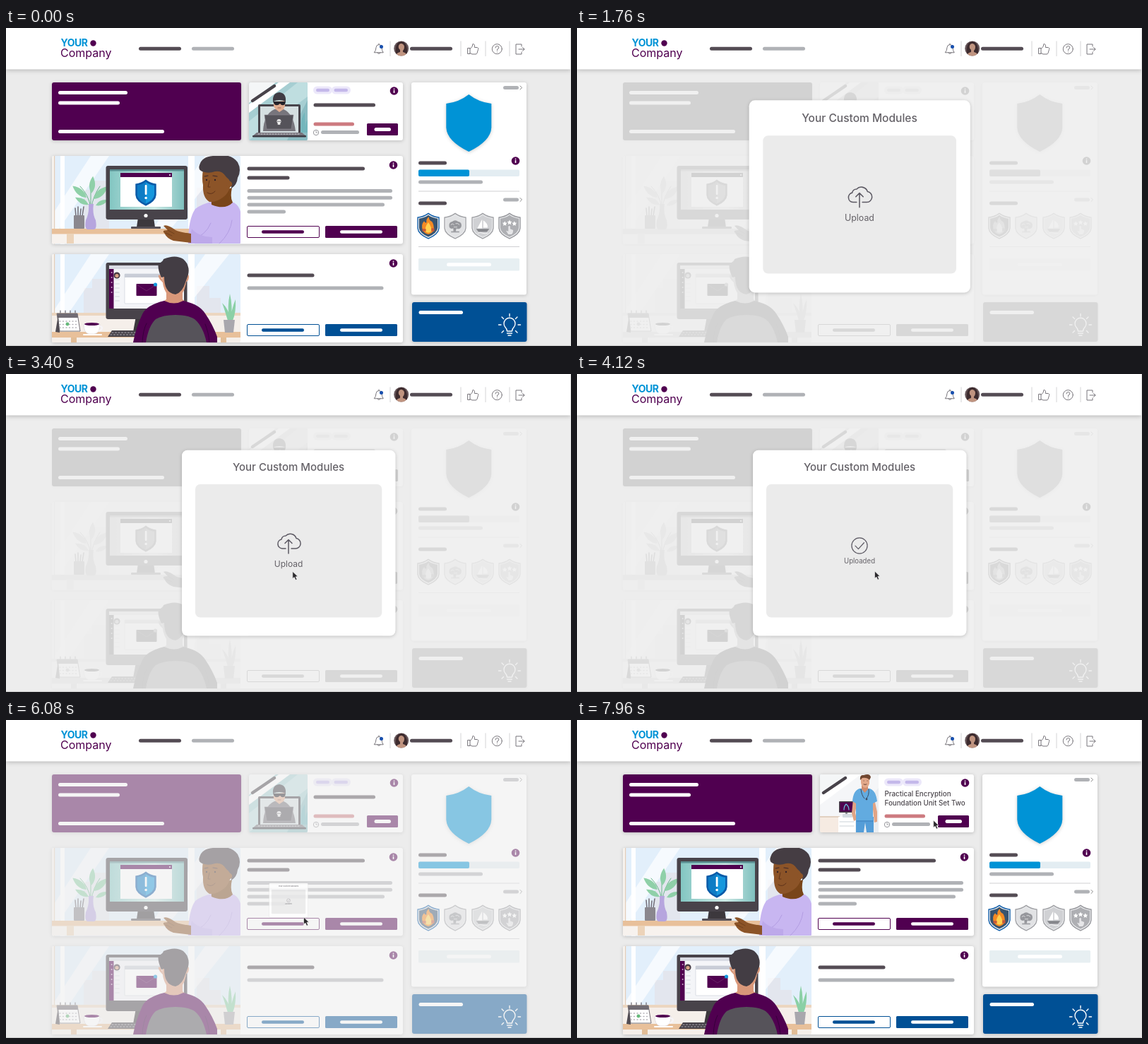
Write an HTML page that moves like this. It is 800 px wide and 450 px high and loops after 8 s.

```html
<!DOCTYPE html>
<html lang="en">
<head>
<meta charset="utf-8">
<title>Custom modules</title>
<style>
  html, body { margin: 0; width: 100%; height: 100%; overflow: hidden; background: #ebebeb; }
  svg { display: block; width: 100vw; height: 100vh; font-family: Inter, "Open Sans", sans-serif; }
  .card { filter: drop-shadow(0 1px 2.5px rgba(0, 0, 0, .2)); }
  .top { filter: drop-shadow(0 1px 3px rgba(0, 0, 0, .25)); }
  .icon { fill: none; stroke: #77747a; stroke-width: 1; stroke-linecap: round; stroke-linejoin: round; }
</style>
</head>
<body>
<svg id="stage" viewBox="0 0 800 450"></svg>
<script>
const LOOP = 8000;
const PURPLE = '#500050', BLUE = '#005095', SKY = '#0093d6', DARK = '#544c54', GREY = '#b0b2b6';

// Drawing helpers
const rect = (x, y, w, h, fill, r = 0, more = '') =>
  `<rect x="${x}" y="${y}" width="${w}" height="${h}" rx="${r}" fill="${fill}" ${more}/>`;
const circle = (x, y, r, fill, more = '') => `<circle cx="${x}" cy="${y}" r="${r}" fill="${fill}" ${more}/>`;
const path = (d, fill, more = '') => `<path d="${d}" fill="${fill}" ${more}/>`;
const line = (d, stroke, width = 1, more = '') =>
  path(d, 'none', `stroke="${stroke}" stroke-width="${width}" stroke-linecap="round" stroke-linejoin="round" ${more}`);
const bar = (x1, x2, y, fill, h = 5) => rect(x1, y - h / 2, x2 - x1, h, fill, h / 2);
const card = (x, y, w, h, fill = '#fff') => rect(x, y, w, h, fill, 3, 'class="card"');
const text = (x, y, size, fill, str, more = '') =>
  `<text x="${x}" y="${y}" font-size="${size}" fill="${fill}" ${more}>${str}</text>`;
const clip = (id, x, y, w, h, art) =>
  `<clipPath id="${id}">${rect(x, y, w, h, '#000', 2)}</clipPath><g clip-path="url(#${id})">${art}</g>`;
const at = (x, y, s, art) => `<g transform="translate(${x} ${y}) scale(${s})">${art}</g>`;

const SHIELD = 'M0-40Q14-29 32-27V7Q31 26 0 41Q-31 26-32 7V-27Q-14-29 0-40Z';
const info = (x, y) => circle(x, y, 5.8, PURPLE) + rect(x - .8, y - 1, 1.6, 4, '#fff') + circle(x, y - 2.7, .9, '#fff');
const chevron = y => line(`M728 ${y - 2.5}l2.5 2.5-2.5 2.5`, '#888');

function buttons(y, color) {
  return rect(341.5, y + .5, 102, 16, '#fff', 1.5, `stroke="${color}"`) + bar(362, 422, y + 8.5, color, 4.5) +
    rect(452, y, 102, 17, color, 1.5) + bar(473, 533, y + 8.5, '#fff', 4.5);
}

function room(y) {
  const tower = (x, top, w) => rect(x, y + top, w, 100, '#e3e6ee');
  return rect(65, y, 267, 125, '#e2effb') +
    tower(110, 48, 14) + tower(122, 35, 24) + tower(270, 45, 18) + tower(284, 62, 20) +
    path(`M65 ${y + 84}L120 ${y}h26L65 ${y + 118}zM210 ${y + 100}L282 ${y}h34L236 ${y + 100}z`, '#fff', 'opacity=".7"') +
    rect(65, y, 3.5, 125, '#f6f2ee') + rect(68, y, 1.2, 125, '#e3cdb8') + rect(77, y, 6, 125, '#fff') + rect(258, y, 9, 125, '#fff');
}

function womanAtDesk() {
  const leaf = (x, y, a, s) => path('M0 0Q-9-12 0-27Q9-12 0 0Z', '#8fd0a8', `transform="translate(${x} ${y}) rotate(${a}) scale(${s})"`);
  return room(181) +
    rect(65, 284, 267, 21, '#f7f2ee') + rect(65, 284, 267, 7.5, '#e8c09a') + rect(86, 291, 10, 14, '#ecd3b9') +
    // plant and pencils
    line('M120 254Q117 236 105 224M121 254Q123 238 133 224M120 252V226', '#6bb58b') +
    leaf(114, 240, -50, .95) + leaf(121, 234, 5, .9) + leaf(124, 242, 48, 1) + leaf(117, 250, -62, .8) + leaf(127, 251, 66, .7) +
    path('M117 249h7Q122 263 127 272Q129 284 125 285H115Q111 283 113 272Q118 262 117 249Z', '#b6a5de') +
    line('M99 266l-1-11M102 266v-13M105 266l1-10M108 266l2-13', '#76717a', 1.6) + rect(96, 265, 15, 19, '#8a878e', 1) +
    // monitor
    path('M187 268h22l2 14h-26z', '#3c383d') + rect(177, 281, 42, 3, '#565158', 1) +
    rect(141.5, 195, 115.5, 76, '#48434a', 3) + rect(147, 200, 105, 57, 'url(#teal)') + rect(147, 200, 105, 2.5, '#5a8e91') +
    circle(198, 265.5, 2.6, '#fff') + rect(162, 205, 73, 48, '#fff') + rect(162, 205, 73, 6, PURPLE) + circle(232, 208, 1, '#fff') +
    at(198, 233, .46, path(SHIELD, '#0b5ba8') + path(SHIELD, '#1597dd', 'transform="scale(.82)"') + path('M0-34V34Q-26 23-26 5V-22Q-12-24 0-34Z', '#0d7cc5')) +
    rect(196.7, 222, 2.8, 14, '#fff', 1) + circle(198.1, 240.5, 1.8, '#fff') +
    // woman
    path('M258 305Q258 270 268 256Q277 249 291 246H320Q329 249 332 260V305Z', '#c8b6f1') +
    path('M290 236L320 226Q317 240 321 247Q310 258 291 250Z', '#794519') +
    path('M279 200Q277 214 279 222Q278 240 288 246Q298 247 308 239Q320 230 319 208L305 196Z', '#8c5428') +
    path('M281 204Q271 202 274 194Q278 180 298 181Q318 177 328 190Q334 201 328 212Q327 222 319 227Q320 217 312 211Q306 201 296 203Q288 206 281 204Z', '#453d43') +
    circle(316, 221, 4.2, '#8c5428') + line('M281 210l5-1M293 209l6 1', '#3c272b', 1.2) +
    circle(284, 215, 1.2, '#332126') + circle(296, 215, 1.2, '#332126') +
    line('M288 216l-2 9h3M285 233q6 4 11-2', '#5e321a') +
    line('M262 300Q283 294 290 276M302 305Q318 290 320 272', '#b29de2') +
    path('M258 305L263 284Q272 295 292 296V305Z', '#bda9ea') +
    path('M262 291Q246 289 240 286Q228 277 223 280L229 286Q220 286 224 290Q228 298 237 301L262 304Z', '#8c5428') + line('M229 286l9 5M226 290l9 4', '#693a1a', .8);
}

function manAtDesk() {
  const rows = [0, 1, 2, 3, 4, 5].map(i => bar(154, 161, 356 + i * 6, '#d5d8e0', 1.2)).join('');
  const dots = [0, 1, 2, 3, 4].map(i => circle(149.6, 346 + i * 7, 1, '#c5a9c5')).join('');
  const days = [0, 1, 2].map(i => line(`M76 ${415 + i * 4.5}h24`, '#b6b4ba', 1.6, 'stroke-dasharray="1 3.5"')).join('');
  return room(320) + rect(65, 403, 267, 42, '#f5efea') + rect(65, 403, 267, 4, '#ecd6c0') + rect(65, 430, 267, 8, '#e8c09a') +
    rect(92, 438, 8, 7, '#e2bd97') + rect(304, 438, 8, 7, '#e2bd97') +
    // monitor
    path('M184 408h26l4 22h-34z', '#3c383d') + rect(141.5, 332, 115, 80, '#48434a', 3) +
    rect(146, 336, 106, 61, '#f4f5f8') + rect(146, 336, 106, 5, '#d9dce4') + rect(146, 341, 6.5, 56, PURPLE) + dots + rows +
    circle(157, 350, 4.6, '#463b45') + circle(157, 350.5, 2.6, '#d8a385') +
    rect(168, 348, 60, 42, '#fff', 1, 'stroke="#cdd1da" stroke-width=".7"') + rect(168, 348, 60, 5, '#c9cdd7') +
    rect(184.5, 362, 29, 17, PURPLE, 1) + line('M185 363l14 9 14-9', '#72306f', .7) + circle(211.5, 363, 2.6, '#1597dd') +
    // desk items
    path('M72 404h29l4 25H76z', '#fff', 'stroke="#716c73"') + path('M72 404h29l1 6H73z', '#716c73') + path('M76 431l-6-1 4-24z', '#504b52') + days +
    circle(87, 419, 2.4, '#66b97a') + line('M77 403v-3M84 403v-3M91 403v-3M98 403v-3', '#504b52') +
    path('M110 419h23q0 13-8 14h-8q-7-2-7-14z', '#fff', 'stroke="#d8d5da" stroke-width=".7"') + line('M133 422q5 1 2 5l-4 2', '#f7f5f8', 2) +
    `<ellipse cx="121.5" cy="419" rx="10.5" ry="2" fill="${PURPLE}"/>` + rect(109, 433, 27, 2, '#fff', 1) +
    path('M150 428h46v9h-52z', '#48434a') + line('M150 431h42M148 434h42', '#aaa5ad', 1.2, 'stroke-dasharray="2 2.5"') +
    // plant
    path('M314 414Q309 397 306 389Q317 399 317 414ZM316 414Q313 393 317 376Q321 393 319 414ZM318 414Q319 398 325 384Q326 402 321 414Z', '#8bd0a6') +
    path('M308 413h16l-2 18h-12z', '#a9a7ad') +
    // man
    path('M221 348L256 346Q256 366 250 375V384Q256 388 253 392H222Q220 388 227 384V375Q221 366 221 348Z', '#d9987a') +
    path('M180 445Q184 424 193 405Q199 392 224 386Q238 393 251 386Q274 391 282 404Q293 420 299 437V445Z', PURPLE) +
    path('M198 445Q202 421 212 412Q222 406 240 406Q258 406 267 412Q279 422 284 445Z', '#56535a') +
    line('M193 445q1-18 6-27M288 445q-1-14-6-26', '#35003a') +
    path('M219 350Q213 348 218 356L223 361ZM255 350Q261 347 258 357L253 361Z', '#d9987a') +
    path('M220 353Q214 340 216 333Q222 331 223 327Q240 320 251 327Q261 336 258 349L254 360Q250 374 240 377Q231 376 227 368Q224 362 224 352Z', '#433d44');
}

const stripe = path('M344 77h38L344 106z', '#f4f6f7') + path('M344 108L386 77h16L344 120z', '#fff') + line('M349 103L380 82', '#48434a', 4.5);

function hackerArt() {
  return rect(344, 77, 83, 82, '#a6ced2') + path('M398 159L427 102v57z', '#8bbcc2') + path('M344 132L413 77h14v20L344 159z', '#bfdee0') + stripe +
    path('M418 148q-2-18 5-29 1 17 1 29zM424 148q-1-14 4-20v20z', '#73b6bc') +
    rect(357, 108, 60, 43, '#48454c', 2) + rect(360, 111, 54, 37, '#d5dfe1') +
    path('M364 146Q365 122 380 115H393Q407 121 410 146Z', '#77757c') +
    path('M379 104Q378 112 382 115L387 119 393 115Q396 110 395 103Z', '#e2ae91') + path('M378 104Q377 92 387 91Q397 92 396 104Q387 100 378 104Z', '#3f3c44') +
    path('M378 104h18l-1 4q-4 3-7-1-4 4-8 1z', '#25232a') + line('M385 113h4', '#8e5749', .9) +
    path('M366 123h41l-3 20h-35z', '#55535a', 'stroke="#8b8990" stroke-width=".6"') +
    circle(386.5, 132, 3, '#eee') + rect(384.7, 133.5, 3.6, 3.3, '#eee') + circle(385.3, 132.2, .8, '#35333b') + circle(387.8, 132.2, .8, '#35333b') +
    path('M355 148h64l6 5H349z', '#77747c') + line('M357 150h60', '#d0d0d4', 1, 'stroke-dasharray="2 2"') + rect(349, 152, 76, 2.4, '#3f3c44', 1);
}

function doctorArt() {
  return rect(344, 77, 83, 82, '#f5f6f8') + path('M372 159L427 96v63z', '#eaeef2') + stripe +
    rect(344, 137, 26, 22, '#f6ebe2') + rect(344, 136, 28, 2, '#e2d0c0') +
    rect(380, 130, 3, 10, '#8f9097') + rect(371, 115, 22, 16, '#474149', 1) + rect(372.5, 116.5, 19, 13, PURPLE) +
    line('M378 127q0-5 3-8 4 3 4 8', '#6cc9df', 1.2) +
    rect(370, 137, 24, 22, '#fff', 1) + line('M372 144h20M372 150h20', '#cbd2d8') + rect(376, 133, 14, 5, '#d5dce2', 1) +
    // doctor
    path('M391 112l-2 20 3 11 4-2-2-10 3-17zM421 112l4 18v14l-4 1-3-28z', '#e0a485') +
    path('M395 137h25v22h-10l-2-14-2 14h-11z', '#549dd8') +
    path('M390 115Q391 100 400 97H414Q423 99 425 115L419 118V142H395V118Z', '#62abe0') +
    path('M403 90h9v8l-4.5 5-4.5-5z', '#cf8c6e') + path('M402 81h12v9q-2 6-6 6-5-1-6-7z', '#e2a88a') + path('M401 85Q400 77 406 78Q415 75 416 81L414 85Q411 81 404 82Z', '#70462f') +
    line('M406 86h.2M411 86h.2M406 91q2 1 4 0', '#4d2d22', .8) +
    line('M402 98q1 9 5 13M413 98q1 8-3 13', '#3b4b60') + circle(410, 112, 1.4, '#3b4b60') + line('M396 143h23', '#397bb4', .8);
}

function badge(x, fill, edge, art) {
  const layer = (color, sx, sy) => path(SHIELD, color, `transform="scale(${sx} ${sy})"`);
  return at(x, 280, 1, layer(edge, .49, .46) + layer('#e8e9eb', .45, .42) + layer(fill, .41, .38) + at(0, 0, .85, art));
}

function badges() {
  const star = (x, y) => path('M0-4l1.2 2.6 2.8.4-2 2 .5 2.8L0 2.5l-2.5 1.3.5-2.8-2-2 2.8-.4z', '#fff', `transform="translate(${x} ${y})"`);
  const grey = '#9fa0a4';
  return badge(598, '#38546f', '#0b5ba8',
      path('M-9 8Q-13-2-7-8Q-5-4-3-6Q-4-12 1-15Q1-9 6-7Q10-2 9 8Q5 13 0 14Q-6 13-9 8Z', '#f48a24') +
      path('M-5 9Q-6 1 0-6Q6 2 5 9Q0 14-5 9Z', '#ffd04f') + rect(-10, 5, 6, 4, '#c6583b') + rect(5, 4, 5, 5, '#c6583b')) +
    badge(636, '#e1e2e4', grey,
      path('M-10 1Q-11-6-5-7Q0-11 5-7Q12-6 10 2Q7 7 2 4L1 9H-3V4Q-9 6-10 1Z', '#96979c') + line('M-7-2q3-3 5 0M1-4q4-1 6 2M-2 2h5', '#e5e5e7') + line('M-6 10h12', '#96979c', 2)) +
    badge(675, '#d0d1d4', grey,
      path('M-1 4V-11L-9 4ZM1 3V-9Q9-4 8 3Z', '#fff') + path('M-11 5h22l-4 5H-7z', '#85868b') + line('M-8 12q4-2 8 0t8 0', '#fff')) +
    badge(713, '#aeafb3', '#95969b',
      star(-8, -4) + star(0, -6) + star(8, -4) + path('M-2 1q2-2 3 0v4l5 2q0 6-3 7H-2l-4-6 4 1z', '#e6e6e8'));
}

function bulb() {
  const rays = [0, 1, 2, 3, 4, 5, 6].map(i => line('M0-12V-15.5', '#fff', 1.4, `transform="rotate(${i * 45 - 135})"`)).join('');
  return at(713, 420, 1, rays + line('M-3.5 9Q-3.5 6-6 3.5A8 8 0 1 1 6 3.5Q3.5 6 3.5 9ZM-3.5 12h7M-2 15h4', '#fff', 1.4));
}

function dashboard() {
  return card(65, 77, 268, 82, PURPLE) + bar(74, 172, 91.5, '#fff') + bar(74, 161, 106, '#fff') + bar(74, 224, 146.5, '#fff') +
    // module card
    card(344, 77, 218, 82) + clip('thumb', 344, 77, 83, 82, hackerArt() + `<g id="doctor">${doctorArt()}</g>`) +
    bar(435, 462, 88, '#ece8fa', 11) + bar(461, 488, 88, '#ece8fa', 11) + bar(439, 458, 88, '#c4b8ea', 4.5) + bar(464.5, 484, 88, '#c4b8ea', 4.5) +
    info(549.5, 89) + `<g id="blank">${bar(435.5, 523, 109, DARK)}</g>` +
    `<g id="title" font-weight="500">${text(435.5, 108, 9.8, '#4c474d', 'Practical Encryption')}${text(435.5, 121, 9.8, '#4c474d', 'Foundation Unit Set Two')}</g>` +
    bar(435.5, 493, 136, '#cd7b80') + circle(439, 148, 3.7, 'none', 'stroke="#8b8b90" stroke-width=".9"') + line('M439 146v2h1.8', '#8b8b90', .8) +
    bar(446, 500, 147.5, GREY) + rect(511, 135, 44, 17, PURPLE, 1.5) + bar(521.5, 545, 143.5, '#fff') +
    // large cards
    card(65, 181, 497, 124.5) + clip('woman', 65, 181, 267, 124.5, womanAtDesk()) +
    bar(341.5, 508, 199, DARK) + bar(341.5, 401.5, 212, DARK) + info(548.5, 194) +
    bar(341.5, 547, 230.5, GREY) + bar(341.5, 547, 240.3, GREY) + bar(341.5, 536, 250.1, GREY) + bar(341.5, 396, 260, GREY) + buttons(280, PURPLE) +
    card(65, 320, 497, 125) + clip('man', 65, 320, 267, 125, manAtDesk()) +
    bar(341.5, 436.5, 350, DARK) + bar(341.5, 534.5, 368, GREY) + info(548.5, 333) + buttons(419, BLUE) +
    // side column
    card(574, 77, 163, 300.5) + bar(704, 726, 84.5, GREY) + chevron(84.5) +
    at(655.3, 134, 1, path(SHIELD, SKY, 'class="card"')) +
    bar(584, 624, 191, DARK) + info(721.5, 188) + rect(584, 200.5, 143, 9.5, '#e3edf2', 2) + rect(584, 200.5, 72, 9.5, SKY, 2) + bar(584, 675, 218, GREY) +
    rect(584, 230.5, 143, 1, '#cfcfd2') + bar(584, 624, 248, DARK) + bar(704, 726, 243, GREY) + chevron(243) + badges() +
    rect(584, 309, 143, 1, '#cfcfd2') + rect(584, 326, 143, 17.5, '#e7eff2', 1.5) + bar(624, 687, 334.7, '#fff') +
    card(575, 388, 162.5, 56, BLUE) + bar(584.5, 647, 402.5, '#fff') + bulb();
}

function header() {
  const rules = [543.5, 643.5, 678.5, 712.5].map(x => rect(x, 18.5, 1, 21.5, '#d4d4d6')).join('');
  const avatar = rect(549, 18, 22, 22, '#66565a') + path('M552 36Q550 20 560 19Q569 20 568 37Z', '#3d2b2e') +
    path('M551 42Q552 35 558 34V31Q555 29 556 25Q557 22 560 22Q564 23 564 27Q564 30 562 32V34Q568 35 569 42Z', '#c09480');
  return rect(0, -6, 800, 64.5, '#fff', 0, 'class="top"') +
    text(77.5, 26, 14, SKY, 'YOUR', 'font-weight="700" letter-spacing="-.5"') + circle(123.5, 21.5, 4.2, PURPLE) +
    text(77, 40.5, 16, PURPLE, 'Company') +
    bar(188, 248, 29.2, DARK) + bar(263, 323, 29.2, GREY) + rules +
    `<clipPath id="face"><circle cx="559.7" cy="29" r="10.5"/></clipPath><g clip-path="url(#face)">${avatar}</g>` + bar(572, 632, 29.2, DARK) +
    `<g class="icon"><path d="M521.5 34.5Q524 32 524 27.5Q524.5 23.5 528 23.5Q531.5 23.5 532 27.5Q532 32 534 34.5ZM526 35q2 3 4 0M528 23.5v-1.5"/>
      <path d="M654 28.5h3v8h-3zM657 29.5l3-3 1-4q3 0 2.5 5h4q2 1 1 3l-1.5 5q-.5 1.5-2 1.5h-5l-3-1.5"/>
      <circle cx="695.3" cy="29.7" r="7"/><path d="M693 28q0-2.5 2.5-2.5 2.3.2 2.3 2.3 0 1.5-2.3 2.5v1.5M695.4 34v.2"/>
      <path d="M730 26v-3h-8v14h8v-3M726 30h8M731.5 27.5l2.5 2.5-2.5 2.5"/></g>` +
    circle(531.5, 26.5, 2.5, '#174fae');
}

function modal() {
  const label = s => text(400, 273, 12, '#656268', s, 'text-anchor="middle"');
  const ink = '#5c5963';
  return rect(249, 107.7, 302.5, 262.8, '#fff', 8, 'class="card"') +
    text(400, 137, 15, '#656268', 'Your Custom Modules', 'text-anchor="middle" font-weight="500"') +
    rect(268, 156, 264.3, 188.5, '#ebebeb', 7) +
    `<g id="upload">${line('M396 247h-5a6.6 6.6 0 0 1-1-13a6 6 0 0 1 6-5a9 9 0 0 1 15 3.5a7.3 7.3 0 0 1-1 14.5h-6M400 254V234.5M395 239.5l5-5 5 5', ink, 1.5)}${label('Upload')}</g>` +
    `<g id="done">${circle(400, 241.3, 13.8, 'none', `stroke="${ink}" stroke-width="1.5"`)}${line('M392.5 241.5l5.5 5.5 10-11', ink, 1.5)}${label('Uploaded')}</g>`;
}

document.getElementById('stage').innerHTML =
  '<defs><linearGradient id="teal" x2="1"><stop stop-color="#83c6c2"/><stop offset=".6" stop-color="#cdeae6"/><stop offset="1" stop-color="#7fc0be"/></linearGradient></defs>' +
  rect(0, 0, 800, 450, '#ebebeb') + `<g id="dash">${dashboard()}</g>` + rect(0, 0, 800, 450, '#eee', 0, 'id="veil"') +
  header() + rect(0, 449, 800, 1, '#cacaca') + rect(799, 0, 1, 450, '#e0e0e0') + `<g id="modal">${modal()}</g>` +
  `<g id="cursor">${path('M0 0V10.2L2.4 8.2 4.3 12.2 6.2 11.3 4.4 7.5 7.4 7.2Z', '#2b292d', 'stroke="#fff" stroke-width=".6"')}</g>`;

// Motion
const part = Object.fromEntries(['dash', 'veil', 'modal', 'upload', 'done', 'cursor', 'doctor', 'title', 'blank']
  .map(id => [id, document.getElementById(id)]));
const span = (t, a, b) => Math.min(1, Math.max(0, (t - a) / (b - a)));
const mix = (a, b, k) => a + (b - a) * k;
const inOut = k => k < .5 ? 4 * k ** 3 : 1 - (2 - 2 * k) ** 3 / 2;
const pop = k => k <= 0 ? 0 : 1 + 1.98 * (k - 1) ** 3 + .98 * (k - 1) ** 2;

function show(el, opacity) {
  el.style.display = opacity > 0 ? '' : 'none';
  el.setAttribute('opacity', opacity);
}
function zoom(el, y, s) {
  el.setAttribute('transform', `translate(400 ${y}) scale(${s}) translate(-400 ${-y})`);
}

function draw(t) {
  const veil = span(t, 1220, 1700) * (1 - span(t, 5900, 6420));
  show(part.veil, veil * .87);
  const fade = span(veil, .7, 1);
  part.dash.style.filter = fade ? `grayscale(${fade})` : 'none';

  const size = t < 4000 ? pop(span(t, 1220, 2020)) : pop(1 - span(t, 5320, 6120));
  show(part.modal, Math.min(1, size * 4.5));
  zoom(part.modal, 258.6, size);

  const sent = span(t, 3660, 3880), done = pop(span(t, 3880, 4680));
  show(part.upload, 1 - sent);
  zoom(part.upload, 250, 1 - sent * sent);
  show(part.done, Math.min(1, done * 2));
  zoom(part.done, 250, done);

  const enter = inOut(span(t, 2800, 3560)), leave = inOut(span(t, 7040, 7960));
  show(part.cursor, t >= 2800 ? 1 : 0);
  part.cursor.setAttribute('transform',
    `translate(${mix(mix(-8, 421.5, enter), 504.7, leave)} ${mix(mix(290, 279, enter), 142, leave)})`);

  const swap = span(t, 6440, 6840);
  show(part.doctor, swap);
  show(part.title, swap);
  show(part.blank, 1 - swap);
}

const start = performance.now();
function tick() {
  draw((performance.now() - start) % LOOP);
  requestAnimationFrame(tick);
}
tick();
</script>
</body>
</html>
```
